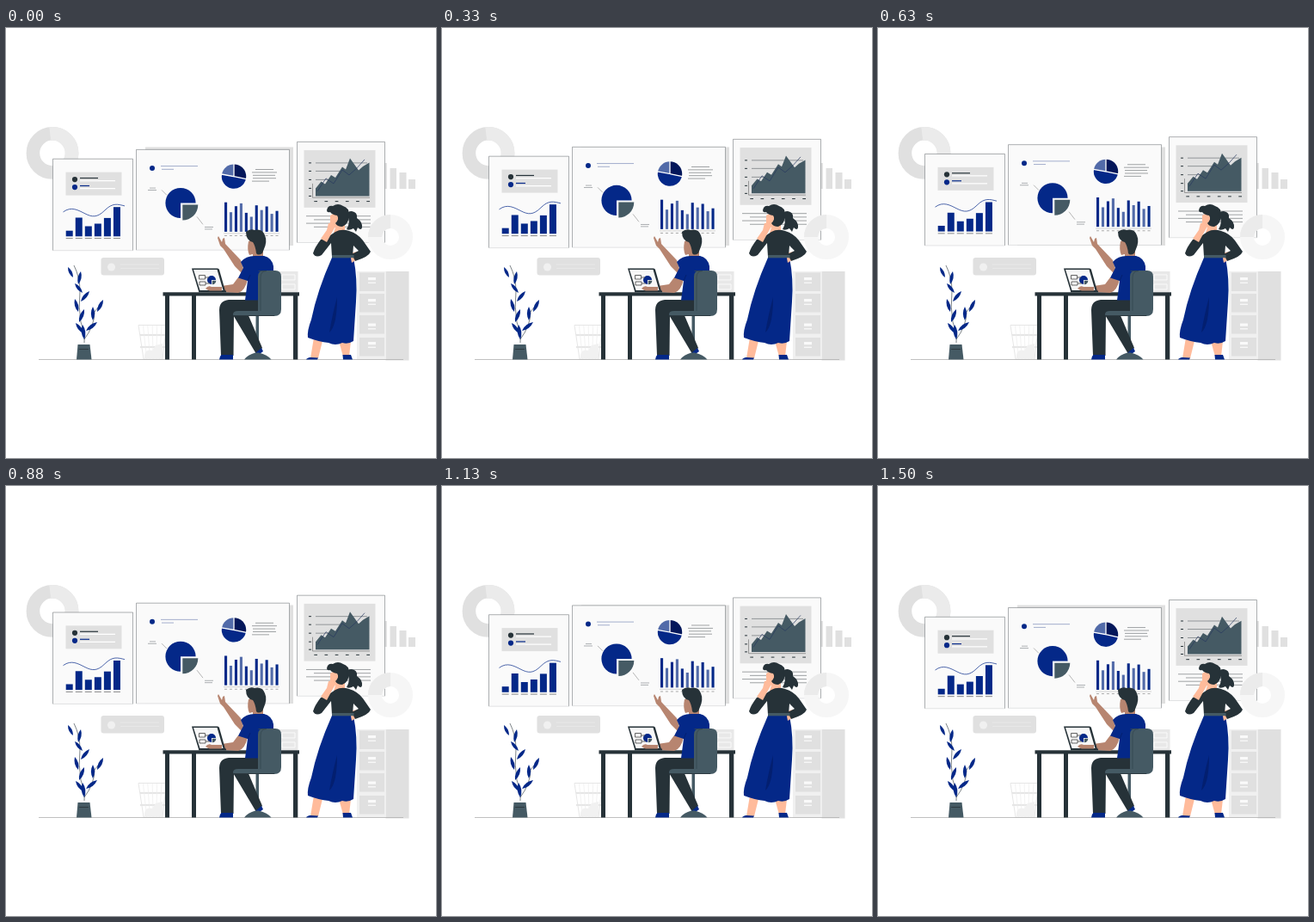
Animation of 500x500 px, one loop 1.54 s. Source, as an HTML page with a canvas:

```html
<!DOCTYPE html>
<html lang="en">
<head>
<meta charset="utf-8">
<title>Office charts</title>
<style>
html, body { margin: 0; width: 100%; height: 100%; overflow: hidden; background: #fff; }
canvas { display: block; width: 500px; height: 500px; }
</style>
</head>
<body>
<canvas id="stage" width="500" height="500"></canvas>
<script>
const ctx = document.getElementById('stage').getContext('2d');
const LOOP = 1540, FPS = 24, STEPS = 37, SWING = 3, PHASE = 1.5;
const BLUE = '#042888', MID = '#526ba9', NAVY = '#04175a', DARK = '#263238', SLATE = '#455a64';
const GREY = '#e0e0e0', PALE = '#f0f0f0', PAPER = '#fafafa', LINE = '#8a8f92';
const BROWN = '#b78570', PEACH = '#ffbb9b';

function box(x, y, x2, y2, color) {
  ctx.fillStyle = color;
  ctx.fillRect(x, y, x2 - x, y2 - y);
}
function round(x, y, x2, y2, r, color) {
  ctx.fillStyle = color;
  ctx.beginPath();
  ctx.roundRect(x, y, x2 - x, y2 - y, r);
  ctx.fill();
}
function dot(x, y, r, color) {
  ctx.fillStyle = color;
  ctx.beginPath();
  ctx.arc(x, y, r, 0, 7);
  ctx.fill();
}
function shape(d, color) {
  ctx.fillStyle = color;
  ctx.fill(new Path2D(d));
}
function stroke(d, color, width = 0.7) {
  ctx.strokeStyle = color;
  ctx.lineWidth = width;
  ctx.stroke(new Path2D(d));
}
function rule(x, x2, y, color = LINE, width = 0.7) {
  stroke(`M${x} ${y}H${x2}`, color, width);
}
function sector(x, y, r, from, to, color) {
  const rad = Math.PI / 180;
  ctx.fillStyle = color;
  ctx.beginPath();
  ctx.moveTo(x, y);
  ctx.arc(x, y, r, from * rad, to * rad);
  ctx.fill();
}
function ring(x, y, r, inner, from, to, color) {
  const rad = Math.PI / 180;
  ctx.strokeStyle = color;
  ctx.lineWidth = r - inner;
  ctx.beginPath();
  ctx.arc(x, y, (r + inner) / 2, from * rad, to * rad);
  ctx.stroke();
}
function leaf(x, y, x2, y2) {
  const mx = (x + x2) / 2, my = (y + y2) / 2, nx = (y2 - y) * 0.27, ny = (x - x2) * 0.27;
  shape(`M${x} ${y}Q${mx + nx} ${my + ny} ${x2} ${y2}Q${mx - nx} ${my - ny} ${x} ${y}`, BLUE);
}
function sheet(x, y, x2, y2) {
  box(x, y, x2, y2, PAPER);
  stroke(`M${x} ${y2}V${y}H${x2}V${y2}`, '#6a6f72', 0.55);
  rule(x, x2, y2, '#cfd1d2', 0.6);
}

function backdrop() {
  ring(54, 145.4, 30.4, 14.8, 0, 360, GREY);
  ring(54, 145.4, 30.4, 14.8, -97, 60, '#ebebeb');
  box(162, 138.5, 334, 253, GREY);
  box(436, 157, 443, 187, GREY);
  box(446.5, 163, 454, 187, GREY);
  box(457.5, 168, 465.5, 187, GREY);
  box(468, 176, 476, 187, GREY);
  round(110.5, 267, 184, 287.5, 3, GREY);
  dot(122.5, 278, 4.5, PALE);
  rule(133, 178, 275, '#ebebeb');
  rule(133, 178, 279.5, '#ebebeb');
}

function listSheet() {
  sheet(54.5, 152.3, 147.5, 258.8);
  box(69.5, 167.7, 134.5, 194.7, GREY);
  [[176.2, 107, DARK], [185.2, 97, BLUE]].forEach(([y, end, color]) => {
    dot(80, y, 3.1, color);
    rule(86, end, y - 1.6, color, 1.2);
    rule(86, 127, y + 1.6, '#fff', 1.2);
  });
  stroke('M66.5 214C76 207 84 212 92 216S106 221 115 212S130 205 138 207', BLUE, 0.7);
  [235.8, 220.6, 230.6, 227.6, 221, 208.3].forEach((top, i) => {
    const x = 69.7 + i * 11.05;
    box(x, top, x + 8, 242.4, BLUE);
    rule(x, x + 8, 244.7, '#555');
  });
}

function boardSheet() {
  sheet(151.5, 141.5, 329.5, 258.3);
  dot(170, 163.2, 3, BLUE);
  rule(180, 223, 160.7, '#7d8db8');
  rule(181, 195, 164.4, '#7d8db8');

  sector(203, 203.6, 17.6, 0, 360, BLUE);
  box(203, 203.6, 222, 222.5, PAPER);
  sector(205.3, 205.7, 18, 0, 90, SLATE);
  stroke('M181 188.5L187 194.5M222 219.5L229 228.5', '#999');
  rule(167, 174, 186.2);
  rule(165, 175, 188.6);
  rule(231, 241, 231.6);
  rule(231, 240, 234);

  sector(265, 172.7, 14.2, 12, 190, BLUE);
  sector(265, 172.7, 14.2, 190, 270, MID);
  sector(265, 172.7, 14.2, -90, 12, NAVY);
  stroke('M265 158V172.7L250.5 170.1M265 172.7L279.5 175.8', '#fff', 1.3);
  [[290, 311], [286, 315], [287, 313], [287, 314], [286, 306]]
    .forEach(([a, b], i) => rule(a, b, 164.6 + i * 3.4, '#777c7f'));

  [202.8, 214.3, 207.3, 204, 215, 219.6, 206.3, 211.8, 207.6, 216.2, 212.8].forEach((top, i) => {
    const x = 254 + i * 5.95;
    box(x, top, x + 3.1, 237, i % 2 ? MID : BLUE);
    rule(x, x + 3, 241.6, '#888');
  });
  rule(253, 318, 239, '#aaa', 0.5);
}

function areaSheet() {
  sheet(338.5, 132.5, 440.5, 249.6);
  box(346.5, 142.2, 429.5, 208.9, GREY);
  [157, 166.5, 176.5].forEach(y => rule(360, 420, y, '#6f7579', 0.7));
  shape('M360 195.5V186.5L366.5 178.7L371 181.5L378 171L383 174L391 161.5L395 164.5L400 151.7L410 165.5L415 161L422.5 156.7V195.5Z', SLATE);
  stroke('M362 190L372 175L381 181L391 165L399 171L408 163L417 153', '#27385f', 0.7);
  stroke('M356.5 181V197.3H423', '#777', 0.7);
  [157, 166.5, 176.5, 186.5, 195.5].forEach(y => rule(352, 355, y, DARK, 1));
  for (let i = 0; i < 6; i++) rule(358.3 + i * 12.2, 362 + i * 12.2, 201.7, DARK, 1);
  [[349, 424], [358, 424], [349, 424], [358, 424]]
    .forEach(([a, b], i) => rule(a, b, 218.8 + i * 4.2, '#777c7f'));
}

function furniture() {
  ring(447, 243, 26, 10, 0, 360, '#f6f6f6');
  ring(447, 243, 26, 10, 180, 270, '#ebebeb');

  box(408, 283, 441, 386, PALE);
  box(441.5, 283, 468.5, 386.5, GREY);
  [[284.5, 290], [309, 315], [334, 343.5], [360, 365]].forEach(([y, label]) => {
    box(411, y, 440, y + 21.5, GREY);
    box(421, label, 430, label + 3.2, PAPER);
    rule(421, 430, label + 6.3, PAPER, 1.2);
  });

  box(318, 283, 339.5, 307, '#e8e8e8');
  [287, 298].forEach(y => stroke(`M321 ${y}H336V${y + 6}H321Z`, '#fafafa', 1));

  stroke('M154 345.5H186.5L182 385H160Z', GREY, 0.8);
  [357, 371].forEach(y => rule(156, 185, y, '#e6e6e6', 2.2));
  for (let i = 1; i < 6; i++) stroke(`M${154 + i * 5.4} 346L${160 + i * 3.7} 385`, '#ededed', 0.7);
  shape('M161 380Q163 373 170 375L174 369L182 367V384H161Z', '#f1f1f1');

  rule(38, 462, 385.5, '#b0b0b0', 0.8);
}

function plant() {
  stroke('M91 366Q92 356 87 342Q84 325 86 306Q86 290 79 276M91 362Q103 346 103 330L107 325M88 317L94 309', DARK, 0.6);
  [[72, 278, 78, 290], [87, 283, 84, 298], [80, 297, 89, 308], [97, 306, 87, 318],
   [80, 315, 84, 330], [91, 327, 85, 342], [81, 343, 90, 355], [89, 345, 91, 362],
   [101, 324, 101, 340], [113, 316, 106, 330], [106, 342, 93, 352]].forEach(p => leaf(...p));
  shape('M83.5 368H97.5L99.5 385.5H82Z', SLATE);
  rule(85, 96, 373.5, DARK, 0.8);
}

function desk() {
  box(185, 311, 190, 385.5, DARK);
  box(216, 311, 221, 385.5, DARK);
  box(334, 311, 339.3, 385.5, DARK);
  box(182.5, 307.3, 341, 311.5, DARK);
}

function man() {
  box(290.5, 335, 294, 379, SLATE);
  shape('M263 332H281L298 372L291 379Z', DARK);
  shape('M290 378L297 372L299 376L292 381Z', BLUE);
  shape('M298 316H259Q248 317 248 328L250 381H264.5L265 333L298 334Z', DARK);
  shape('M250.5 380H264V385.5H248Q248 382 250.5 380Z', BLUE);

  shape('M276 280L273 270L255 251L254 244L252 245L251 249L247 242L246 244L249 253L253 257L266 277L276 287Z', BROWN);
  shape('M282 248Q280 258 283 264L287 263V268H299V253L293 244Z', BROWN);
  shape('M279 237Q284 233 289 235Q298 233 301 241Q304 248 300 257L298 262Q293 265 291 262Q290 253 287 249Q279 247 279 237Z', DARK);
  shape('M270 290L281 292Q278 306 270 308L240 306L233 303L237 300L244 301L264 298Z', BROWN);
  shape('M273 272Q279 265 289 265H300Q309 267 311 277V300L296 316.5H278L281 294L270 290.5L276 279Z', BLUE);
  stroke('M284 287L281 294', '#021d66', 0.7);

  shape('M216 279.5H246Q247.5 279.5 248 281L255 306H224Z', DARK);
  shape('M218 281H245.5L252.5 305H225.5Z', '#f7f7f7');
  sector(239, 293, 5, 90, 360, BLUE);
  sector(239.8, 293.8, 4.5, 0, 90, SLATE);
  stroke('M224.5 287.5H231.5V292H224.5ZM225 295H232V299H225ZM231.5 290H236M232 297H237', '#555', 0.9);
  shape('M232 303Q235 299 239 301L251 301V306H237Z', BROWN);
  box(224, 305.5, 256, 307.3, DARK);

  shape('M264 333Q264 329 270 329H293V289Q293 282 300 282H313Q320 282 320 289V327Q320 335 312 335H268Q264 335 264 333Z', SLATE);
  stroke('M296 329V290Q296 282.5 303 282.5H293.5', '#344750', 0.8);
  stroke('M265 334.5H312', DARK, 0.8);
  shape('M277 385.5Q281 380 290 377.5H294Q304 380 308.5 385.5Z', SLATE);
}

function woman() {
  shape('M358 360H369L363 384H354Z', PEACH);
  shape('M387 364H401L399 382H392Z', PEACH);
  shape('M354 383L363 383.5L362 385.5H349Q350 383.5 354 383Z', BLUE);
  shape('M391.5 380H401L403 385.5H392Z', BLUE);
  shape('M379 267H404Q409 292 407 318L404 364Q398 368 391 366Q383 370 375 366Q364 365 351 360Q350 352 355 339Q362 305 379 267Z', BLUE);
  shape('M385 313Q380 331 376 354Q385 346 385 313Z', '#031f70');

  shape('M400 262L408 260L411 267L402 273Z', PEACH);
  shape('M377 218V227L383 232L381 238H394V219L382 215Z', PEACH);
  shape('M383 237Q390 233 399 236Q409 239 415 247L424 260Q422 266 406 271L402 263L410 259L404 253L403 266H379L378 250L367 264Q360 268 357 262Q359 255 366 246L374 243Z', DARK);
  shape('M366 245L373 235L375 227L381 226L384 229L380 236L373 249Z', PEACH);
  box(379, 264, 404.5, 267.3, SLATE);

  shape('M373 212Q374 206 380 207Q386 203 392 207Q399 209 399 217Q399 228 391 231Q385 231 383 227Q388 222 385 218Q379 217 377 214Q373 215 373 212Z', DARK);
  shape('M397 218Q396 213 402 213Q409 214 408 221Q415 226 414 232Q413 236 409 232L407 237L404 233Q399 236 396 234Q401 226 397 218Z', DARK);
  dot(383.5, 222, 2.3, PEACH);
}

function draw(now) {
  const t = now % LOOP;
  const step = Math.floor((Math.floor(t / 10) * 10 + 4.9) * FPS / 1000);
  const lift = SWING * (Math.cos(2 * Math.PI * (step + PHASE) / STEPS) - 1);

  ctx.fillStyle = '#fff';
  ctx.fillRect(0, 0, 500, 500);
  backdrop();
  ctx.save();
  ctx.translate(0, lift);
  listSheet();
  boardSheet();
  areaSheet();
  ctx.restore();
  furniture();
  plant();
  desk();
  man();
  woman();
}

let start;
function tick(now) {
  start ??= now;
  draw(now - start);
  requestAnimationFrame(tick);
}
draw(0);
requestAnimationFrame(tick);
</script>
</body>
</html>
```
